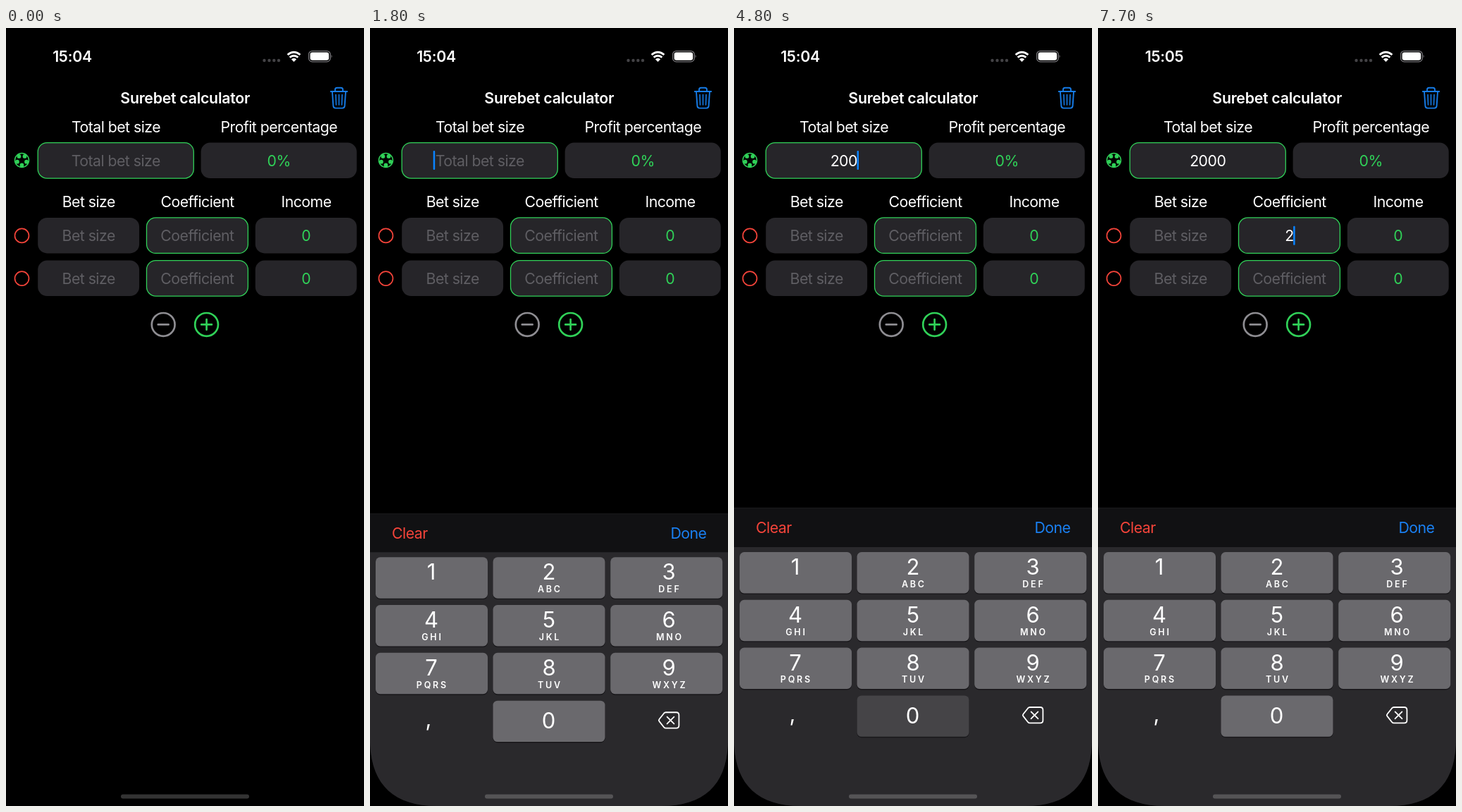
Recreate the animation shown at these times as an HTML page. Size 508 by 1103 pixels, loop 8 s.

```html
<!DOCTYPE html>
<html lang="en">
<head>
<meta charset="utf-8">
<title>Surebet calculator</title>
<style>
html, body { margin: 0; width: 100%; height: 100%; overflow: hidden; background: #000; }
svg { display: block; width: 100%; height: 100%; }
text { font: 21.3px Inter, Roboto, sans-serif; letter-spacing: -.54px; text-anchor: middle; fill: #fff; white-space: pre; }
text.bold { font-weight: 600; letter-spacing: -.27px; }
text.hint { fill: #5f5e63; }
text.green { fill: #30d158; }
text.digit { font-size: 31px; letter-spacing: 0; }
text.abc { font-size: 12.5px; font-weight: 600; letter-spacing: 2.8px; }
.line { fill: none; stroke-linecap: round; stroke-linejoin: round; }
</style>
</head>
<body>
<svg id="stage" viewBox="0 0 508 1103"></svg>
<script>
const LOOP = 8000;
const GREEN = '#30d158', RED = '#f5443a', BLUE = '#0a84ff';
const stage = document.getElementById('stage');

const label = (x, y, str, cls = '', extra = '') =>
  `<text x="${x}" y="${y}" class="${cls}" ${extra}>${str}</text>`;
const box = (x, y, w, h, r, fill, extra = '') =>
  `<rect x="${x}" y="${y}" width="${w}" height="${h}" rx="${r}" fill="${fill}" ${extra}/>`;
const line = (d, color, width) =>
  `<path class="line" d="${d}" stroke="${color}" stroke-width="${width}"/>`;
const ring = (x, y, r, color, width) =>
  `<circle cx="${x}" cy="${y}" r="${r}" fill="none" stroke="${color}" stroke-width="${width}"/>`;
const field = (x, y, w, str, cls, active, id = '') =>
  box(x, y, w, 50.5, 13, '#262529', active ? `stroke="${GREEN}" stroke-width="1.3"` : '') +
  label(x + w / 2, y + 33, str, cls, id && `id="${id}"`);

function statusBar() {
  const dots = [366.5, 373.5, 380.3, 387]
    .map(x => `<circle cx="${x}" cy="46" r="2.2" fill="#444346"/>`).join('');
  const wifi = '<path d="M408.5 48L404.8 44.2Q408.5 41.2 412.2 44.2Z" fill="#fff"/>' +
    '<path d="M402.6 41.6Q408.5 36.8 414.4 41.6M399.6 38Q408.5 30.6 417.4 38" fill="none" stroke="#fff" stroke-width="2.8"/>';
  const battery = box(429.6, 32.6, 30.6, 15.2, 5, 'none', 'stroke="#77767a" stroke-width="1.3"') +
    box(431.6, 34.6, 26.6, 11.2, 3.2, '#fff') +
    '<path d="M461.6 37.8Q463.6 40.2 461.6 42.6Z" fill="#77767a"/>';
  return label(94, 48, '15:04', 'bold', 'id="clock"') + dots + wifi + battery;
}

function trash() {
  return line('M460.8 90H484.2M467 89.5V87.5Q467 84.8 469.7 84.8H475.3Q478 84.8 478 87.5V89.5' +
    'M463 90.5L464.4 110.4Q464.6 113.6 467.8 113.6H477.2Q480.4 113.6 480.6 110.4L482 90.5', '#167ce8', 1.9) +
    line('M468 94.5L468.5 109M472.5 94.5V109M477 94.5L476.5 109', '#167ce8', 1.6);
}

function ball(cx, cy) {
  let s = ring(cx, cy, 10, GREEN, 1.5);
  for (let i = 0; i < 5; i++) {
    const a = (90 + 72 * i) * Math.PI / 180;
    s += `<circle cx="${cx + 6.9 * Math.cos(a)}" cy="${cy + 6.9 * Math.sin(a)}" r="2.9" fill="${GREEN}"/>`;
  }
  return s;
}

function page() {
  const rows = [268.9, 329.6].map((y, i) =>
    ring(22.5, y + 25.5, 10, RED, 1.7) +
    field(45.2, y, 143.9, 'Bet size', 'hint') +
    field(199.5, y, 143.9, 'Coefficient', 'hint', true, i ? '' : 'coef') +
    field(353.8, y, 143.9, '0', 'green')).join('');
  return statusBar() + trash() +
    label(254.2, 106.5, 'Surebet calculator', 'bold') +
    label(156, 147.5, 'Total bet size') + label(387.3, 147.5, 'Profit percentage') +
    ball(22.5, 187.5) +
    field(45.2, 162.6, 221.1, 'Total bet size', 'hint', true, 'total') +
    field(276.6, 162.6, 221.1, '0%', 'green') +
    label(117.3, 253.8, 'Bet size') + label(271.6, 253.8, 'Coefficient') + label(426, 253.8, 'Income') +
    rows +
    ring(223.2, 420.4, 16.4, '#8e8d92', 2.7) + line('M215.8 420.4H230.6', '#8e8d92', 2.7) +
    ring(284.6, 420.4, 16.4, GREEN, 2.7) + line('M277.2 420.4H292M284.6 413V427.8', GREEN, 2.7);
}

function keyboard() {
  const letters = ['', 'ABC', 'DEF', 'GHI', 'JKL', 'MNO', 'PQRS', 'TUV', 'WXYZ'];
  const left = [8, 174.5, 341.2], middle = [87, 254, 424];
  const key = (n, col, y) =>
    box(left[col], y + 1.4, 159, 58.4, 6.5, '#18171a') +
    box(left[col], y, 159, 58.4, 6.5, '#6a696d', `id="key${n}"`);
  const keys = letters.map((abc, i) => {
    const col = i % 3, y = 743 + 67.8 * Math.floor(i / 3);
    return key(i + 1, col, y) + label(middle[col], y + 32, i + 1, 'digit') +
      label(middle[col] + 1.4, y + 49.7, abc, 'abc');
  }).join('');
  return `<g id="bar">${box(0, 680, 508, 423, 0, '#111113')}${box(0, 680, 508, 1, 0, '#1a1a1c')}
    ${label(31, 716, 'Clear', '', `style="text-anchor:start;fill:${RED}"`)}
    ${label(477.5, 716, 'Done', '', 'style="text-anchor:end;fill:#1a80f2"')}</g>
    <g id="keys">${box(0, 736, 508, 367, 0, '#2a292c')}${keys}
    ${key(0, 1, 946.4)}${label(253.6, 986, 0, 'digit')}${label(83, 983, ',', 'digit')}
    ${line('M419.8 963H434.6Q438.4 963 438.4 966.8V981.6Q438.4 985.4 434.6 985.4H419.8' +
      'Q418.2 985.4 417.2 984.2L410.4 975.6Q409.2 974.2 410.4 972.8L417.2 964.2Q418.2 963 419.8 963Z' +
      'M421.6 969.4L431.4 979.2M431.4 969.4L421.6 979.2', '#fff', 1.8)}</g>`;
}

stage.innerHTML = `<clipPath id="screen"><path d="M0 0H508V1008C508 1071 476 1103 413 1103H95C32 1103 0 1071 0 1008Z"/></clipPath>
  ${page()}<rect id="caret" width="2.5" height="27" rx="1" fill="${BLUE}"/>
  <g clip-path="url(#screen)">${keyboard()}</g>${box(163, 1086.6, 182, 6, 3, '#fff', 'opacity=".2"')}`;

const $ = id => document.getElementById(id);
const ui = Object.fromEntries(['clock', 'total', 'coef', 'caret', 'bar', 'keys', 'key0', 'key2'].map(id => [id, $(id)]));

// [time, focused field, its value]
const edits = [[1400, 'total', ''], [4000, 'total', '2'], [4200, 'total', '20'], [4600, 'total', '200'],
  [5000, 'total', '2000'], [6200, 'coef', ''], [7500, 'coef', '2']];
// [down, up, key]
const presses = [[3900, 4000, 2], [4100, 4300, 0], [4500, 4600, 0], [4800, 5000, 0], [7400, 7500, 2]];
const spots = { total: [156, 174], coef: [271.5, 280.8] };

const clamp = v => Math.max(0, Math.min(1, v));

// Caret stays lit, fades out, then fades back in
function blink(age) {
  const p = Math.max(0, age) % 900;
  return p < 700 ? clamp((620 - p) / 140) : clamp((p - 780) / 120);
}

function setField(el, value, hint) {
  const str = value || hint;
  if (el.textContent !== str) el.textContent = str;
  el.setAttribute('class', value ? '' : 'hint');
}

function render(t) {
  const done = edits.filter(e => e[0] <= t);
  const valueOf = name => (done.filter(e => e[1] === name).pop() || [])[2];
  setField(ui.total, valueOf('total'), 'Total bet size');
  setField(ui.coef, valueOf('coef'), 'Coefficient');
  ui.clock.textContent = t < 7400 ? '15:04' : '15:05';

  const now = done[done.length - 1];
  if (now) {
    const [start, name, value] = now, [x, y] = spots[name];
    const half = ui[name].getComputedTextLength() / 2;
    ui.caret.setAttribute('x', value ? x + half - .6 : x - half - 3.2);
    ui.caret.setAttribute('y', y);
    ui.caret.setAttribute('opacity', blink(t - (start === 1400 ? 1610 : start)));
  } else {
    ui.caret.setAttribute('opacity', 0);
  }

  // Critically damped spring
  const wt = Math.max(0, t - 1392) * .0143;
  const rest = (1 + wt) * Math.exp(-wt);
  ui.bar.setAttribute('transform', `translate(0 ${423 * rest})`);
  ui.keys.setAttribute('transform', `translate(0 ${367 * rest})`);
  for (const n of [0, 2]) {
    const down = presses.some(([a, b, k]) => k === n && t >= a && t < b);
    ui['key' + n].setAttribute('fill', down ? '#454447' : '#6a696d');
  }
}

function tick() {
  render(performance.now() % LOOP);
  requestAnimationFrame(tick);
}
tick();
</script>
</body>
</html>
```
